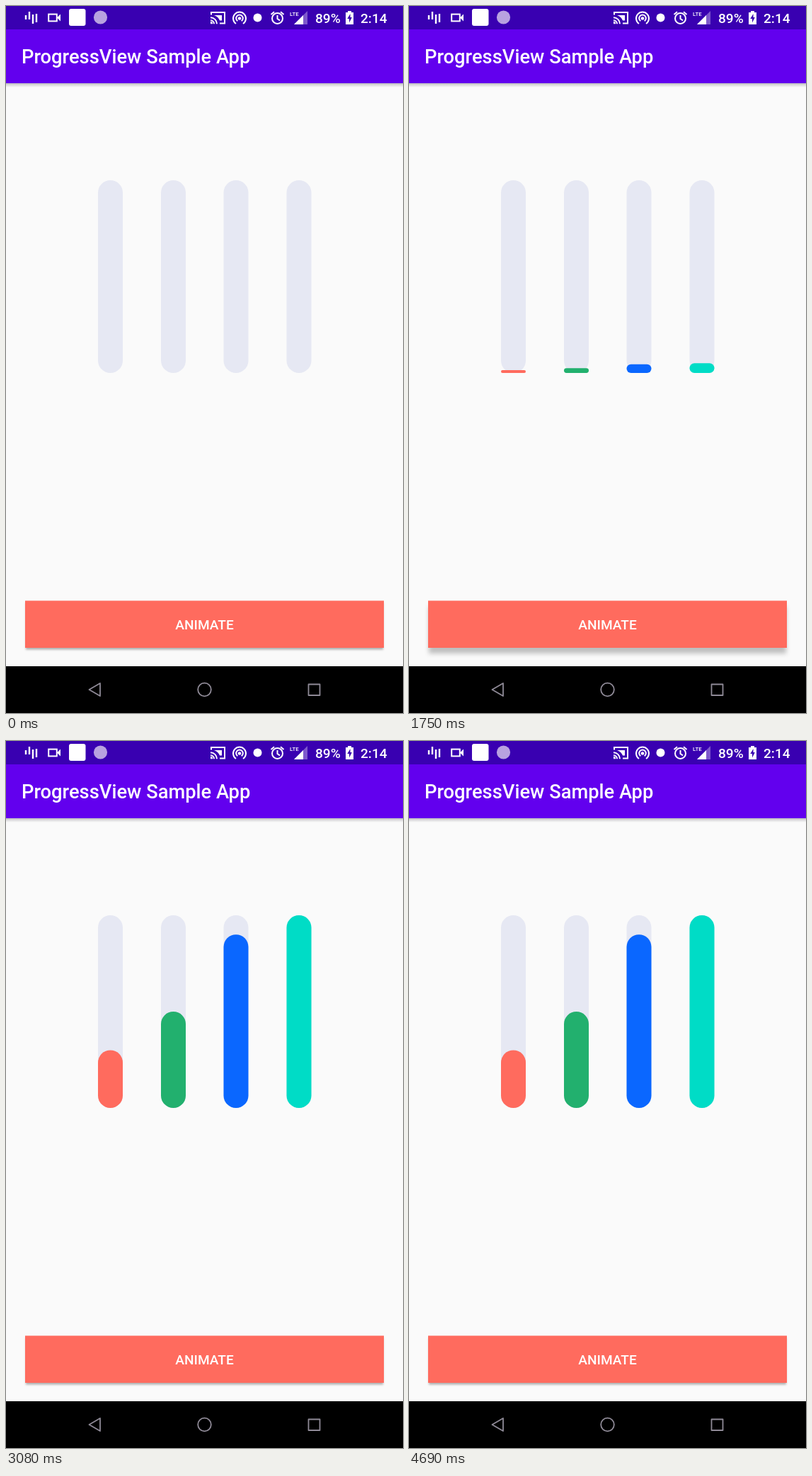
An HTML page for the animation above (4760 ms loop, 561 by 998 pixels).

```html
<!DOCTYPE html>
<html lang="en">
<head>
<meta charset="utf-8">
<title>Progress bars</title>
<style>
  html, body { margin: 0; width: 100%; height: 100%; overflow: hidden; background: #fafafa; }
  svg { display: block; width: 561px; height: 998px; }
  text { font-family: Roboto, Arial, sans-serif; font-weight: 500; fill: #fff; }
</style>
</head>
<body>
<svg viewBox="0 0 561 998" xmlns="http://www.w3.org/2000/svg">
  <defs>
    <linearGradient id="drop" x1="0" y1="0" x2="0" y2="1">
      <stop offset="0" stop-color="#000" stop-opacity=".24"/>
      <stop offset=".5" stop-color="#000" stop-opacity=".1"/>
      <stop offset="1" stop-color="#000" stop-opacity="0"/>
    </linearGradient>
    <filter id="blur" filterUnits="userSpaceOnUse" x="0" y="810" width="561" height="150">
      <feGaussianBlur id="soft" stdDeviation="1.5"/>
    </filter>
  </defs>

  <rect width="561" height="998" fill="#fafafa"/>
  <rect y="109" width="561" height="6" fill="url(#drop)"/>
  <rect y="32" width="561" height="77" fill="#6200ee"/>
  <rect width="561" height="33" fill="#3900b1"/>
  <text x="22" y="81" font-size="27.3">ProgressView Sample App</text>

  <!-- status bar, left -->
  <g fill="none" stroke="#fff" stroke-width="2.4">
    <path d="M28 13V19M33 8V19M38 12V25M43 11V23"/>
    <rect x="60.2" y="11.6" width="11.6" height="9.8" stroke-width="2"/>
  </g>
  <path d="M72 16.5L77 11.5V21.5Z" fill="#fff"/>
  <rect x="89" y="4" width="23.5" height="24" rx="3" fill="#fff"/>
  <circle cx="133.500" cy="16" r="9.6" fill="#b8a2e0"/>

  <!-- status bar, right -->
  <g fill="none" stroke="#fff" stroke-width="2">
    <path d="M290 12.500V9H309V24.500H302"/>
    <path d="M289 16.200A9 9 0 0 1 298 25.200M289 20.200A5 5 0 0 1 294 25.200"/>
    <path d="M294 13H305V20.500H302A13 13 0 0 0 294 13Z" fill="#fff" stroke="none"/>
    <path d="M325 25A9 9 0 1 1 335 25M327.300 21.200A4.800 4.800 0 1 1 332.700 21.200"/>
    <circle cx="383.500" cy="17.500" r="7.500"/>
    <path d="M383.500 13V18L387 20.300M374.500 12L379 8.200M392.500 12L388 8.200"/>
  </g>
  <path d="M289 22V25.200H292.200A3.200 3.200 0 0 0 289 22Z" fill="#fff"/>
  <circle cx="330" cy="17.500" r="2.300" fill="#fff"/>
  <circle cx="355.500" cy="16.500" r="6" fill="#fff"/>
  <path d="M407 26L426 7V26Z" fill="#fff" opacity=".35"/>
  <path d="M407 26L420 13V26Z" fill="#fff"/>
  <text x="401" y="14" font-size="7.800">LTE</text>
  <text x="437" y="23.700" font-size="19.100">89%</text>
  <path d="M480 9H483V7H488V9H491V26H480Z" fill="#fff"/>
  <path d="M486.500 11L482.300 18H485V23.500L488.800 16H486.500Z" fill="#3900b1"/>
  <text x="501" y="23.700" font-size="19.100">2:14</text>

  <g id="bars"></g>

  <rect id="shade" x="28" width="505" height="66" filter="url(#blur)"/>
  <rect x="27" y="839.500" width="507" height="66.500" fill="#ff6b5e"/>
  <text x="280.500" y="880" font-size="19.100" text-anchor="middle">ANIMATE</text>

  <!-- navigation bar -->
  <rect y="932" width="561" height="66"/>
  <g fill="none" stroke="#8f8a97" stroke-width="1.800" stroke-linejoin="round">
    <path d="M117.500 965L133 956V974Z"/>
    <circle cx="280.500" cy="965" r="9.300"/>
    <rect x="427.500" y="957.500" width="16" height="15.500"/>
  </g>
</svg>
<script>
  const LOOP = 4760, STEP = 70, DURATION = 1000;
  const TOP = 246, HEIGHT = 272, WIDTH = 35, BOTTOM = TOP + HEIGHT;
  const bars = [
    { x: 130, share: 0.3, color: '#ff6b5e' },
    { x: 219, share: 0.5, color: '#22b06e' },
    { x: 307.5, share: 0.9, color: '#0a67ff' },
    { x: 396.5, share: 1, color: '#00dcc6' }
  ];
  // A tap lifts the button while held; its release restarts the bars.
  const taps = [
    { down: 270, up: 408 },
    { down: 1465, up: 1606 },
    { down: 1635, up: 2031 },
    { down: 3440, up: 3671 }
  ];

  const byId = id => document.getElementById(id);
  const clamp = v => Math.min(1, Math.max(0, v));
  const set = (el, attrs) => {
    for (const k in attrs) el.setAttribute(k, attrs[k]);
    return el;
  };
  const addRect = attrs => {
    const el = document.createElementNS('http://www.w3.org/2000/svg', 'rect');
    return byId('bars').appendChild(set(el, attrs));
  };

  for (const b of bars) {
    addRect({ x: b.x, y: TOP, width: WIDTH, height: HEIGHT, rx: WIDTH / 2, fill: '#e6e8f3' });
    b.fill = addRect({ x: b.x, width: WIDTH, fill: b.color });
  }

  function progress(t) {
    const last = taps.filter(p => p.up <= t).pop();
    return last ? (1 - Math.cos(Math.PI * clamp((t - last.up) / DURATION))) / 2 : 0;
  }

  const lift = t => Math.max(...taps.map(p =>
    Math.min(clamp((t - p.down) / 100), clamp(1 - (t - p.up) / 100))));

  function draw(t) {
    const p = progress(t), e = lift(t);
    for (const b of bars) {
      const h = HEIGHT * b.share * p;
      set(b.fill, { y: BOTTOM - h, height: h, rx: Math.min(WIDTH, h) / 2 });
    }
    set(byId('shade'), { y: 842.5 + 5.5 * e, 'fill-opacity': 0.3 - 0.06 * e });
    set(byId('soft'), { stdDeviation: 1.5 + 1.5 * e });
  }

  const start = performance.now();
  function tick() {
    const t = (performance.now() - start) % LOOP;
    draw(Math.floor(t / STEP) * STEP);
    requestAnimationFrame(tick);
  }
  tick();
</script>
</body>
</html>
```
